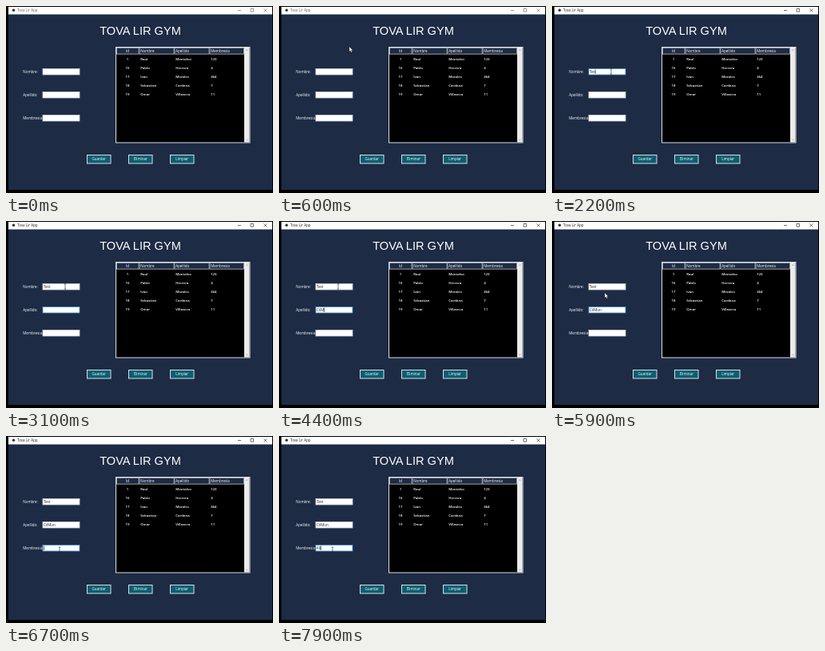
An HTML page for the animation above (8 s loop, 334x234 px).

```html
<!DOCTYPE html>
<html lang="es">
<head>
<meta charset="utf-8">
<title>Tova Lir App</title>
<style>
  html, body { margin: 0; width: 100%; height: 100%; overflow: hidden; background: #000; }
  svg { display: block; width: 100vw; height: 100vh; }
  text { font: 4.5px "Open Sans", "Noto Sans", sans-serif; fill: #fff; white-space: pre; }
  .heading { font: 14.6px "Liberation Sans", Arial, sans-serif; }
  .row { font-weight: 600; font-size: 4.3px; }
  .mid { text-anchor: middle; }
  .dark { fill: #222; }
  .caret { fill: #000; }
</style>
</head>
<body>
<svg id="stage" viewBox="0 0 334 234"></svg>
<script>
const LOOP = 8000, STEP = 100;
const NAVY = '#1d2b45', TEAL = '#0b5f70', LIGHT = '#d9dde2';
const stage = document.getElementById('stage');

function add(tag, attrs, content) {
  const el = document.createElementNS('http://www.w3.org/2000/svg', tag);
  for (const k in attrs) el.setAttribute(k, attrs[k]);
  if (content !== undefined) el.textContent = content;
  stage.appendChild(el);
  return el;
}
const box = (x, y, width, height, fill, stroke = 'none', sw = 1) =>
  add('rect', { x, y, width, height, fill, stroke, 'stroke-width': sw });
const label = (x, y, s, cls = '') => add('text', { x, y, class: cls }, s);
const line = (d, stroke, sw = 0.6) =>
  add('path', { d, fill: 'none', stroke, 'stroke-width': sw });

// Window
box(3, 1, 330, 229, NAVY);
box(3, 1, 330, 9.5, '#fff');
add('circle', { cx: 9.5, cy: 5.3, r: 1.7, fill: '#333' });
const chrome = [
  label(14, 7.2, 'Tova Lir App', 'dark'),
  line('M290 5.5h4', '#111'),
  line('M306 3.5h3.6v3.6h-3.6z', '#111'),
  line('M322.5 3.5l3.8 3.8m0 -3.8l-3.8 3.8', '#111')
];
label(168, 36, 'TOVA LIR GYM', 'heading mid');

// Table
box(137.5, 51.5, 167.5, 119.5, '#000', LIGHT);
box(298, 52, 6.5, 118.5, '#ececec');
line('M299.9 56l1.4 -1.4l1.4 1.4', '#888');
line('M299.9 166.6l1.4 1.4l1.4 -1.4', '#888');
const cols = [[138, 'Id'], [166.5, 'Nombre'], [210.5, 'Apellido'], [254.5, 'Membresia'], [298]];
cols.slice(0, 4).forEach(([x, name], i) => {
  box(x + 0.4, 52.5, cols[i + 1][0] - x - 0.8, 7.6, NAVY, LIGHT, 0.7);
  label(i ? x + 1.7 : 152, 57.9, name, i ? '' : 'mid');
});
[
  ['1', 'Raul', 'Montalvo', '123'],
  ['16', 'Pablo', 'Herrera', '4'],
  ['17', 'Ivan', 'Morales', '464'],
  ['18', 'Sebastian', 'Cardona', '7'],
  ['19', 'Omar', 'Villaseca', '11']
].forEach((row, r) => row.forEach((s, i) =>
  label(i ? cols[i][0] + 1.7 : 152, 67.6 + r * 11.1, s, i ? 'row' : 'row mid')));

// Buttons
['Guardar', 'Eliminar', 'Limpiar'].forEach((s, i) => {
  const x = 101.5 + i * 52;
  box(x, 186.5, 29.5, 10.5, TEAL, LIGHT);
  label(x + 14.75, 193.4, s, 'mid');
});

// Form
const fields = ['Nombre:', 'Apellido:', 'Membresia:'].map((s, i) => {
  const y = 78.5 + i * 29;
  label(21.3, y + 5.4, s);
  return { y, frame: box(46, y, 46, 7.5, '#fff', '#c9ced6', 0.8),
    text: label(47.1, y + 5.4, '', 'dark') };
});
const caret = box(0, 0, 0.6, 5.4, '#000');
const arrow = add('path', { d: 'M0 0v6l1.4 -1.2l1 2.2l1 -.5l-1 -2.1h1.9z',
  fill: '#fff', stroke: '#222', 'stroke-width': 0.3 });
const beam = line('M-1.2 -3.2h2.4M0 -3.2v6.4M-1.2 3.2h2.4', '#222', 0.6);

const focusAt = [[1000, 0], [2600, 1], [6700, 2]];
const typing = [
  { word: 'Test', at: [1900, 2000, 2200, 2500] },
  { word: 'CilMun', at: [3500, 3700, 3900, 4300, 5000, 5200] },
  { word: '48', at: [7600, 7900] }
];
// Events that restart the caret blink
const resets = [1000, 6700, ...typing.flatMap(w => w.at)];

const path = [
  [300, 100, 4], [500, 94, 34], [700, 82, 68], [900, 74, 82],
  [5600, 74, 82], [5700, 72, 86], [5900, 66, 90], [6100, 61, 120], [6300, 67, 142.3]
];
function pointer(t) {
  const i = path.findIndex(p => p[0] > t);
  if (i < 0) return path[path.length - 1].slice(1);
  const a = path[i - 1], b = path[i], k = (t - a[0]) / (b[0] - a[0]);
  return [a[1] + (b[1] - a[1]) * k, a[2] + (b[2] - a[2]) * k];
}
const show = (el, on) => el.setAttribute('visibility', on ? 'visible' : 'hidden');

function draw(t) {
  chrome.forEach(el => el.setAttribute('opacity', t >= 1000 ? 1 : 0.7));

  const focus = focusAt.reduce((f, [at, i]) => t >= at ? i : f, -1);
  fields.forEach((f, i) => {
    const { word, at } = typing[i];
    f.text.textContent = word.slice(0, at.filter(a => t >= a).length);
    f.frame.setAttribute('stroke', i === focus ? '#3d8fd1' : '#c9ced6');
  });

  const last = Math.max(...resets.filter(a => a <= t));
  show(caret, focus >= 0 && (t - last) % 900 < 600);
  if (focus >= 0) {
    const f = fields[focus];
    const w = f.text.textContent ? f.text.getComputedTextLength() : 0;
    caret.setAttribute('x', 47 + w);
    caret.setAttribute('y', f.y + 1);
  }

  const visible = t >= path[0][0];
  const [x, y] = visible ? pointer(t) : [0, 0];
  const inside = x > 46 && x < 92 && fields.some(f => y >= f.y && y <= f.y + 7.5);
  show(arrow, visible && !inside);
  show(beam, visible && inside);
  [arrow, beam].forEach(el => el.setAttribute('transform', `translate(${x} ${y})`));
}

const start = performance.now();
function tick() {
  const t = (performance.now() - start) % LOOP;
  draw(Math.floor(t / STEP) * STEP);
  requestAnimationFrame(tick);
}
tick();
</script>
</body>
</html>
```
